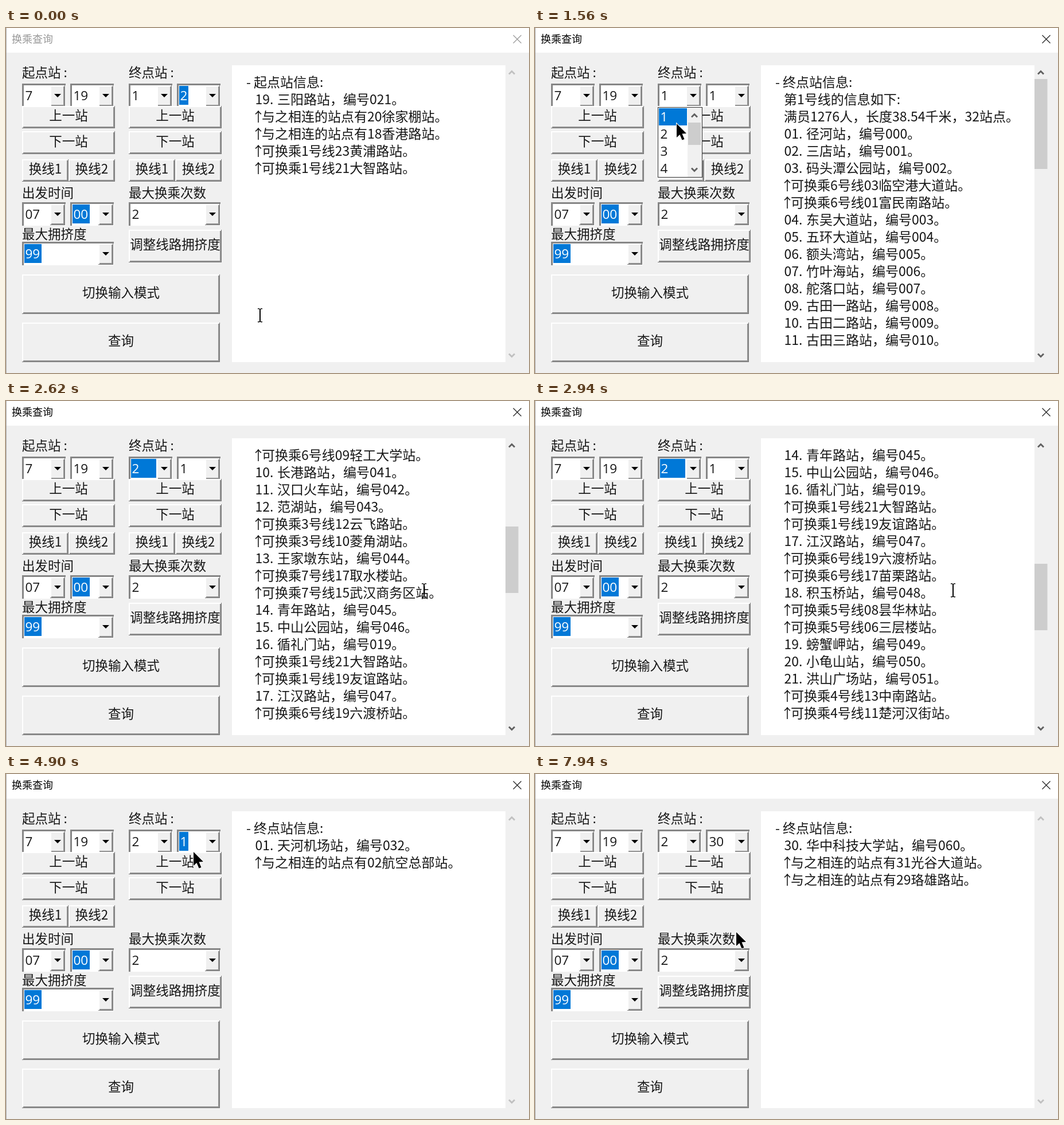
An HTML page with a canvas that plays this animation: 912x602 px, repeating every 8000 ms.

```html
<!DOCTYPE html>
<html lang="zh-CN">
<head>
<meta charset="utf-8">
<style>
html, body { margin: 0; width: 100%; height: 100%; overflow: hidden; background: #f0f0f0; }
canvas { display: block; }
</style>
</head>
<body>
<canvas id="stage" width="912" height="602"></canvas>
<script>
const ctx = document.getElementById('stage').getContext('2d');
const LOOP = 8000, ROWS = 16;
const CJK = '"Noto Sans CJK SC", "Noto Sans CJK", sans-serif';
const LABEL = '350 22.5px ' + CJK, LIST = '23px ' + CJK, DIGITS = '22.5px "Open Sans", sans-serif';
const FACE = '#f0f0f0', BLUE = '#0078d7', THUMB = '#cdcdcd', INK = '#161616';

// Moments at which the user's actions take effect
const ACTIVATE = 820, LINE_OPEN = 960, LINE_INFO = 1040, LINE_PICK = 1790, LINE_BLUR = 3490,
      STOP_OPEN = 4300, STOP_PICK = 4650, TYPE_3 = 5200, TYPE_30 = 5460;

const pointerPath = [
  [50, 443, 501], [850, 275, 122], [960, 275, 122], [1560, 247, 167], [1740, 250, 182],
  [1800, 250, 182], [2200, 731, 330], [2620, 729, 330], [3000, 729, 330], [3400, 520, 391],
  [3600, 520, 391], [4040, 360, 120], [4300, 360, 120], [4620, 325, 150], [4900, 327, 136],
  [5060, 327, 136], [5250, 342, 119], [5920, 342, 119], [6250, 396, 190], [6660, 332, 195],
  [6750, 332, 195], [7150, 325, 352], [7540, 323, 275], [7610, 323, 275], [7930, 351, 276]
];

// Stations separated by |; each transfer is a line digit followed by its stop
const line1 = '径河|三店|码头潭公园,603临空港大道,601富民南路|东吴大道|五环大道|额头湾|竹叶海|舵落口|古田一路|古田二路|古田三路';
const line2 = '天河机场|航空总部|宋家岗|巨龙大道,710汤云海,708腾龙大道|盘龙城|宏图大道,803塔子湖,801金潭路,302市民之家|' +
  '常青城|金银潭|常青花园,611杨汊湖,609轻工大学|长港路|汉口火车站|范湖,312云飞路,310菱角湖|王家墩东,717取水楼,715武汉商务区|' +
  '青年路|中山公园|循礼门,121大智路,119友谊路|江汉路,619六渡桥,617苗栗路|积玉桥,508昙华林,506三层楼|螃蟹岬|小龟山|' +
  '洪山广场,413中南路,411楚河汉街|中南路,414梅苑小区,412洪山广场|宝通寺|街道口,819马房山,817小洪山|广埠屯|虎泉|杨家湾|' +
  '光谷广场|珞雄路|华中科技大学|光谷大道|佳园路|光谷火车站|黄龙山路|金融港北|秀湖|藏龙东街|佛祖岭';

const pad = (n, size) => String(n).padStart(size, '0');
const stationName = name => name.endsWith('站') ? name : name + '站';
const stopRow = (n, name, id) => `${pad(n, 2)}. ${stationName(name)}，编号${pad(id, 3)}。`;
const linked = stop => `↑与之相连的站点有${stop}站。`;
const transfer = (line, stop) => `↑可换乘${line}号线${stop}站。`;
const id2 = n => n < 16 ? 31 + n : n === 16 ? 19 : 30 + n;

function lineInfo(number, summary, stations, id) {
  const rows = ['- 终点站信息:', `第${number}号线的信息如下:`, summary];
  stations.split('|').forEach((entry, i) => {
    const [name, ...transfers] = entry.split(',');
    rows.push(stopRow(i + 1, name, id(i + 1)));
    transfers.forEach(s => rows.push(transfer(s[0], s.slice(1))));
  });
  return rows;
}

const startInfo = ['- 起点站信息:', stopRow(19, '三阳路', 21), linked('20徐家棚'), linked('18香港路'),
  transfer(1, '23黄浦路'), transfer(1, '21大智路')];
const info1 = lineInfo(1, '满员1276人，长度38.54千米，32站点。', line1, n => n - 1);
const info2 = lineInfo(2, '满员1468人，长度60.80千米，38站点。', line2, id2);
const stopInfo = (n, name, ...links) => ['- 终点站信息:', stopRow(n, name, id2(n)), ...links.map(linked)];
const stop1 = stopInfo(1, '天河机场', '02航空总部');
const stop3 = stopInfo(3, '宋家岗', '04巨龙大道', '02航空总部');
const stop30 = stopInfo(30, '华中科技大学', '31光谷大道', '29珞雄路');

const clamp = (v, lo, hi) => Math.max(lo, Math.min(hi, v));
const notches = (t, start, gap, max) => clamp(Math.floor((t - start) / gap) + 1, 0, max);

function rect(x, y, w, h, color) {
  ctx.fillStyle = color;
  ctx.fillRect(x, y, w, h);
}

function text(s, x, y, font = LABEL, color = INK, align = 'left') {
  ctx.font = font;
  ctx.fillStyle = color;
  ctx.textAlign = align;
  ctx.fillText(s, x, y);
}

function shape(points, fill, stroke, width = 1, closed = true) {
  ctx.beginPath();
  points.forEach(([x, y]) => ctx.lineTo(x, y));
  if (closed) ctx.closePath();
  if (stroke) { ctx.strokeStyle = stroke; ctx.lineWidth = width; ctx.stroke(); }
  if (fill) { ctx.fillStyle = fill; ctx.fill(); }
}

function bevel(x, y, w, h) {
  rect(x, y, w, h, '#787878');
  rect(x, y, w - 1, h - 1, '#fff');
  rect(x + 2, y + 2, w - 3, h - 3, '#909090');
  rect(x + 2, y + 2, w - 5, h - 5, FACE);
}

function button(label, x, y, w, h, centerY) {
  bevel(x, y, w, h);
  text(label, x + w / 2, centerY + 7.5, LABEL, INK, 'center');
}

// selected: width of the highlight behind the value, 0 for none
function combo(value, x, y, w, selected = 0) {
  rect(x, y, w, 41, '#868686');
  rect(x + 3, y + 3, w - 3, 38, '#fff');
  bevel(x + w - 27, y + 3, 26, 37);
  const cx = x + w - 14;
  shape([[cx - 6, y + 18], [cx + 6, y + 18], [cx, y + 24]], '#000');
  if (selected) rect(x + 4, y + 4, selected, 33, BLUE);
  text(value, x + 5.5, y + 29, DIGITS, selected ? '#fff' : INK);
}

function chevron(cx, cy, dir, color, size = 5) {
  shape([[cx - size, cy + 2.5 * dir], [cx, cy - 2.5 * dir], [cx + size, cy + 2.5 * dir]], null, color, 2.8, false);
}

function dropdown(x, thumbHeight) {
  rect(x, 138, 78, 123, '#333');
  rect(x + 1, 139, 76, 121, '#fff');
  rect(x + 2, 140, 49, 30, BLUE);
  for (let i = 0; i < 4; i++) text(i + 1, x + 4.5, 163 + 30 * i, DIGITS, i ? INK : '#fff');
  rect(x + 52, 139, 25, 121, FACE);
  rect(x + 53, 165, 22, thumbHeight, THUMB);
  chevron(x + 64, 153, 1, '#606060');
  chevron(x + 64, 247, -1, '#606060');
}

function listRow(row, y) {
  if (row[0] === '-') {
    text('-', 419, y, LIST);
    text(row.slice(2), 432, y, LIST);
  } else if (row[0] === '↑') {
    text('↑', 440, y, LIST, INK, 'center');
    text(row.slice(1), 446, y, LIST);
  } else if (row[2] === '.') {
    text(row.slice(0, 3), 434.5, y, LIST);
    text(row.slice(4), 473, y, LIST);
  } else {
    text(row, 434, y, LIST);
  }
}

function infoPanel(t) {
  const rows = t < LINE_INFO ? startInfo : t < LINE_PICK ? info1 : t < STOP_PICK ? info2
    : t < TYPE_3 ? stop1 : t < TYPE_30 ? stop3 : stop30;
  const total = rows === info1 ? 48 : rows.length + 1;
  const top = rows === info2 ? 3 * (notches(t, 2250, 70, 6) + notches(t, 2700, 85, 9)) : 0;
  const scrollable = total > ROWS;
  rect(394, 65, 477, 518, '#fff');
  rows.slice(top, top + ROWS).forEach((row, i) => listRow(row, 102.5 + 30 * i));
  if (scrollable) rect(871, Math.round(89 + top * 470 / total), 22.5, Math.round(470 * ROWS / total), THUMB);
  const color = scrollable ? '#606060' : '#c0c0c0';
  chevron(882, 78, 1, color);
  chevron(882, 571, -1, color);
}

function titleBar(active) {
  rect(0, 0, 912, 43, '#fff');
  text('换乘查询', 10, 26, '18px ' + CJK, active ? '#000' : '#999');
  const color = active ? '#222' : '#999';
  shape([[884.5, 12.5], [898.5, 26.5]], null, color, 1.2, false);
  shape([[898.5, 12.5], [884.5, 26.5]], null, color, 1.2, false);
  rect(0, 0, 1, 602, '#b0b0b0');
}

function stationButtons(x, canSwitch) {
  button('上一站', x, 136, 162, 39, 153);
  button('下一站', x, 180, 162, 40, 198);
  if (!canSwitch) return;
  button('换线1', x, 229, 81, 39, 246);
  button('换线2', x + 81, 229, 81, 39, 246);
}

function controls(t) {
  text('起点站 :', 28, 85.5);
  text('终点站 :', 214, 85.5);
  text('出发时间', 28, 295.5);
  text('最大换乘次数', 214, 295.5);
  text('最大拥挤度', 28, 367.5);

  combo('7', 28, 97, 76);
  combo('19', 112, 97, 76);
  const picked = t >= LINE_PICK;
  combo(picked ? '2' : '1', 214, 97, 76, picked && t < LINE_BLUR ? 44 : 0);
  const stop = t < LINE_INFO ? '2' : t < TYPE_3 ? '1' : t < TYPE_30 ? '3' : '30';
  const stopSelected = t < LINE_INFO || (t >= STOP_PICK && t < TYPE_3);
  combo(stop, 298, 97, 76, stopSelected ? 16 : 0);
  if (t >= TYPE_3 && Math.floor((t - TYPE_3) / 530) % 2 === 0) {
    rect(304.5 + 12.9 * stop.length, 102, 1.5, 30, '#000');
  }
  stationButtons(28, true);
  stationButtons(214, t < STOP_PICK);

  combo('07', 28, 304, 76);
  combo('00', 112, 304, 76, 30);
  combo('2', 214, 304, 160);
  combo('99', 28, 373, 160, 30);
  button('调整线路拥挤度', 214, 352, 162, 57, 378);
  button('切换输入模式', 28, 430, 345, 69, 462);
  button('查询', 28, 514, 345, 69, 546);

  if (t >= LINE_OPEN && t < LINE_PICK) dropdown(214, 39);
  if (t >= STOP_OPEN && t < STOP_PICK) dropdown(298, 16);
}

function pointerAt(t) {
  const next = pointerPath.findIndex(k => k[0] > t);
  if (next === 0) return pointerPath[0].slice(1);
  if (next < 0) return pointerPath[pointerPath.length - 1].slice(1);
  const [t0, x0, y0] = pointerPath[next - 1], [t1, x1, y1] = pointerPath[next];
  const p = (t - t0) / (t1 - t0), e = p * p * (3 - 2 * p);
  return [x0 + (x1 - x0) * e, y0 + (y1 - y0) * e];
}

function pointer(t) {
  const [x, y] = pointerAt(t).map(Math.round);
  const overList = x > 394 && x < 871 && y > 65 && y < 583;
  const overEdit = y > 100 && y < 136 && ((x > 217 && x < 263) || (x > 301 && x < 347));
  ctx.save();
  ctx.translate(x, y);
  if (overList || overEdit) {
    rect(-1, -11, 2, 23, '#000');
    for (const edge of [-12, 11]) {
      rect(-4, edge, 3, 1.5, '#000');
      rect(1, edge, 3, 1.5, '#000');
    }
  } else {
    shape([[0, 0], [0, 24], [5.5, 19], [9.5, 28.5], [13.5, 27], [9.5, 17.5], [17, 17]], '#000', '#fff', 2);
  }
  ctx.restore();
}

function draw(now) {
  const t = now % LOOP;
  rect(0, 0, 912, 602, FACE);
  titleBar(t >= ACTIVATE);
  infoPanel(t);
  controls(t);
  pointer(t);
  requestAnimationFrame(draw);
}
requestAnimationFrame(draw);
</script>
</body>
</html>
```
